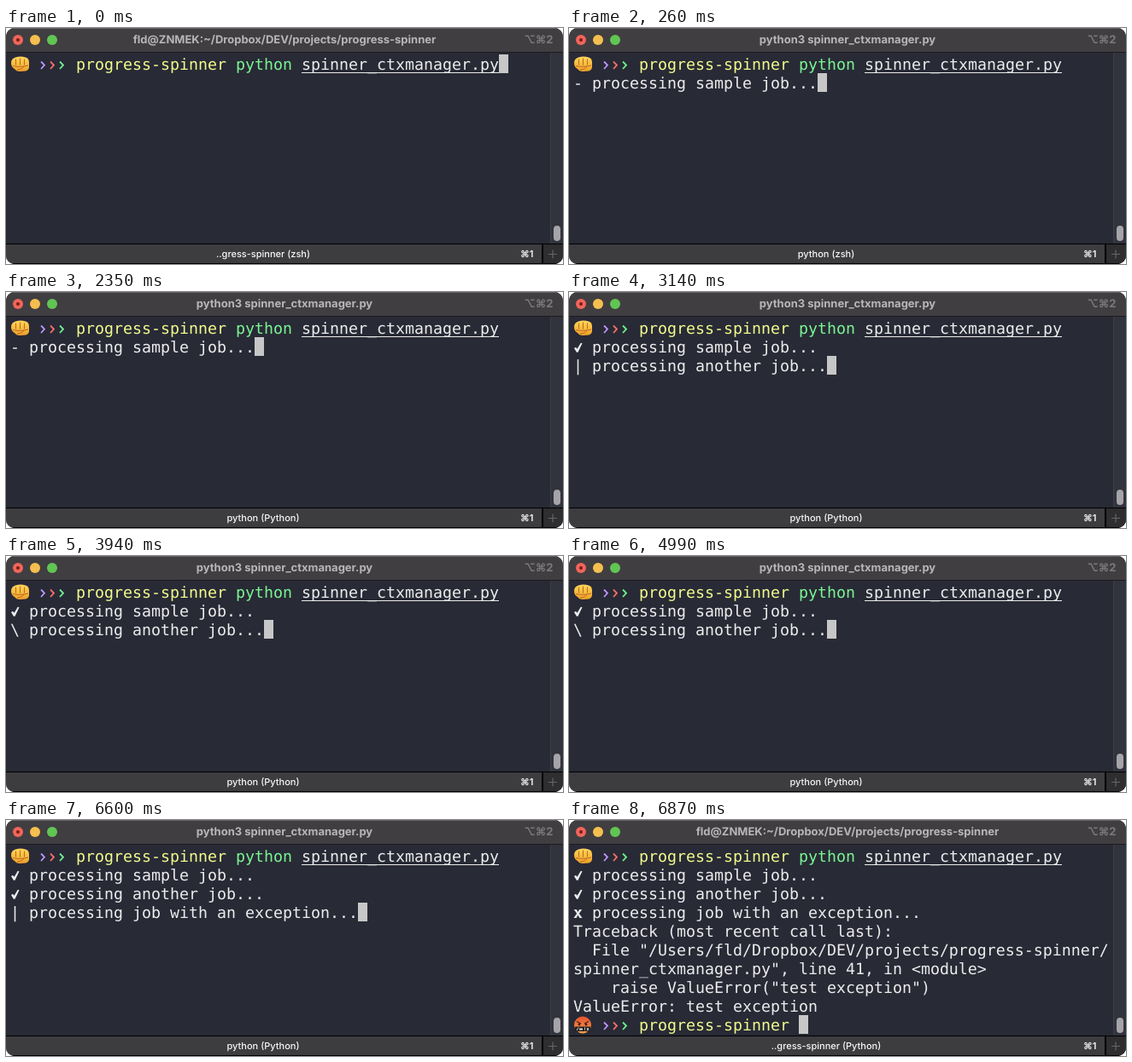
Write an HTML page that moves like this. It is 652 px wide and 277 px high and loops after 8000 ms.

```html
<!DOCTYPE html>
<html lang="en">
<head>
<meta charset="utf-8">
<title>Terminal spinner</title>
<style>
html, body { margin: 0; width: 100%; height: 100%; overflow: hidden; background: #fff; }
svg { display: block; width: 652px; height: 277px; }
text { white-space: pre; text-rendering: geometricPrecision; }
.mono { font: 18.27px "DejaVu Sans Mono", monospace; fill: #ececec; }
.ui { font: 500 11px Inter, "DejaVu Sans", sans-serif; fill: #f8f8f8; }
.ui.title { font-size: 13px; font-weight: 700; fill: #b7b6b8; }
.mid { text-anchor: middle; }
</style>
</head>
<body>
<svg viewBox="0 0 652 277">
  <defs>
    <clipPath id="win"><rect width="652" height="277" rx="10"/></clipPath>
    <linearGradient id="skin" x2="0" y2="1">
      <stop stop-color="#ffd65a"/><stop offset="1" stop-color="#f0a02c"/>
    </linearGradient>
    <linearGradient id="rage" x2="0" y2="1">
      <stop stop-color="#e2532f"/><stop offset="1" stop-color="#f8a04a"/>
    </linearGradient>
    <g id="arrows" fill="none" stroke-width="1.8">
      <path d="M41 7.5l4 4-4 4.5" stroke="#bd93f9"/>
      <path d="M52 7.5l4 4-4 4.5" stroke="#ff6e67"/>
      <path d="M63 7.5l4 4-4 4.5" stroke="#6df58a"/>
    </g>
    <g id="fist">
      <path d="M6 9q0-5 5-6.500 6-2 12 0 4 1 4 6v5q0 4-4 5l-7 .5q-4 0-6-3-4-2-4-7z" fill="url(#skin)"/>
      <path d="M11.500 4.500v7M16.500 3.500v8M21.500 4.500v7M8 12.500q7 2 18-.5M13 17q5 0 8-3.500" fill="none" stroke="#b86c18"/>
    </g>
    <g id="rant">
      <circle cx="16" cy="10.500" r="10" fill="url(#rage)"/>
      <path d="M9 6.500l5 2.500M23 6.500l-5 2.500" stroke="#4a1a10" stroke-width="1.300"/>
      <circle cx="12" cy="10" r="1.400" fill="#4a1a10"/>
      <circle cx="20" cy="10" r="1.400" fill="#4a1a10"/>
      <rect x="7" y="12.500" width="18" height="5.500" rx="1" fill="#25201f"/>
      <path d="M9 17l2-3.500M13 14v3M15 14v3M12 15.500h4M18.500 13.500v2.300M18.500 16.500v.8M21 14l2 3M23 14l-2 3" stroke="#fff" stroke-width=".8"/>
    </g>
    <path id="tick" d="M6 12l2-1.300 1.600 2 4.200-7 1.700.5-5 10.600h-1.600z" fill="#ececec"/>
  </defs>
  <g clip-path="url(#win)">
    <rect width="652" height="277" fill="#282a36"/>
    <rect width="652" height="28" fill="#403e41"/>
    <rect width="652" height="1" fill="#656366"/>
    <rect y="28" width="652" height="1" fill="#1b1b1f"/>
    <rect x="637" y="29" width="15" height="224" fill="#31333d"/>
    <rect x="637" y="29" width="1" height="224" fill="#3b3d47"/>
    <rect x="641" y="232" width="8" height="18" rx="4" fill="#a5a5a9"/>
    <rect y="253" width="652" height="24" fill="#3d3c3f"/>
    <rect y="253" width="652" height="1" fill="#000"/>
    <rect x="628" y="254" width="24" height="23" fill="#2e2d30"/>
    <rect x="627" y="254" width="2" height="23" fill="#000"/>
    <rect y="276" width="652" height="1" fill="#000"/>
    <path d="M635 265.500h10M640 260.500v10" stroke="#66656a" stroke-width="1.200"/>
    <circle cx="14" cy="14" r="6" fill="#f0655a"/>
    <circle cx="14" cy="14" r="2" fill="#7d1a14"/>
    <circle cx="34" cy="14" r="6" fill="#f5bf4f"/>
    <circle cx="54" cy="14" r="6" fill="#61c554"/>
    <text class="ui title mid" id="title" x="326" y="18"></text>
    <text class="ui title" x="640.500" y="17.500" text-anchor="end" style="fill:#7b797c">⌥⌘2</text>
    <text class="ui mid" id="tab" x="301" y="269"></text>
    <text class="ui" x="602" y="269" style="font-weight:600">⌘1</text>
    <g id="screen" class="mono"></g>
  </g>
</svg>
<script>
const LOOP = 8000;
const times = [0, 260, 520, 790, 1050, 1310, 1570, 1830, 2090, 2350, 2610, 2870, 3140, 3410,
  3670, 3940, 4210, 4470, 4730, 4990, 5260, 5530, 5790, 6060, 6330, 6600, 6870];
const END = times.length - 1;
const SPIN = "-\\|/";
const jobs = [
  { start: 1, end: 10, phase: 0, name: "sample job" },
  { start: 10, end: 20, phase: 0, name: "another job" },
  { start: 20, end: END, phase: 1, name: "job with an exception", fails: true },
];
const trace = [
  "Traceback (most recent call last):",
  '  File "/Users/fld/Dropbox/DEV/projects/progress-spinner/',
  'spinner_ctxmanager.py", line 41, in <module>',
  '    raise ValueError("test exception")',
  "ValueError: test exception",
];
const el = id => document.getElementById(id);
const colX = col => 5 + 11 * col;
const rowY = row => 31 + 22 * row;
const esc = s => s.replace(/&/g, "&amp;").replace(/</g, "&lt;");

const put = (row, col, s, style = "") =>
  `<text x="${colX(col)}" y="${rowY(row) + 18}" style="${style}">${esc(s)}</text>`;
const use = (id, row) => `<use href="#${id}" y="${rowY(row) + 1}"/>`;
const cursor = (row, col) =>
  `<rect x="${colX(col)}" y="${rowY(row)}" width="11" height="22" fill="#c7c7c7"/>`;
const prompt = (row, face) =>
  use(face, row) + use("arrows", row) + put(row, 7, "progress-spinner", "fill:#f1fa8c");

function mark(job, row, step) {
  if (step < job.end) return put(row, 0, SPIN[(step - job.start + job.phase) % 4]);
  return job.fails ? put(row, 0, "x", "font-weight:bold") : use("tick", row);
}

function draw(step) {
  let out = prompt(0, "fist") + put(0, 24, "python", "fill:#7bf492") +
    put(0, 31, "spinner_ctxmanager.py") +
    `<rect x="346" y="52" width="231" height="1" fill="#ececec"/>`;
  let at = [0, 52];
  jobs.forEach((job, i) => {
    if (step < job.start) return;
    const label = `processing ${job.name}...`;
    out += mark(job, i + 1, step) + put(i + 1, 2, label);
    at = [i + 1, 2 + label.length];
  });
  if (step === END) {
    trace.forEach((line, i) => out += put(4 + i, 0, line));
    out += prompt(9, "rant");
    at = [9, 24];
  }
  el("screen").innerHTML = out + cursor(...at);

  const idle = step === 0 || step === END;
  const app = step >= 4 ? "Python" : "zsh";
  el("title").textContent = idle
    ? "fld@ZNMEK:~/Dropbox/DEV/projects/progress-spinner"
    : "python3 spinner_ctxmanager.py";
  el("tab").textContent = `${idle ? "..gress-spinner" : "python"} (${app})`;
}

let shown = -1;
const begin = performance.now();
function tick() {
  const t = (performance.now() - begin) % LOOP;
  const step = times.filter(x => x <= t).length - 1;
  if (step !== shown) draw(shown = step);
  requestAnimationFrame(tick);
}
tick();
</script>
</body>
</html>
```
